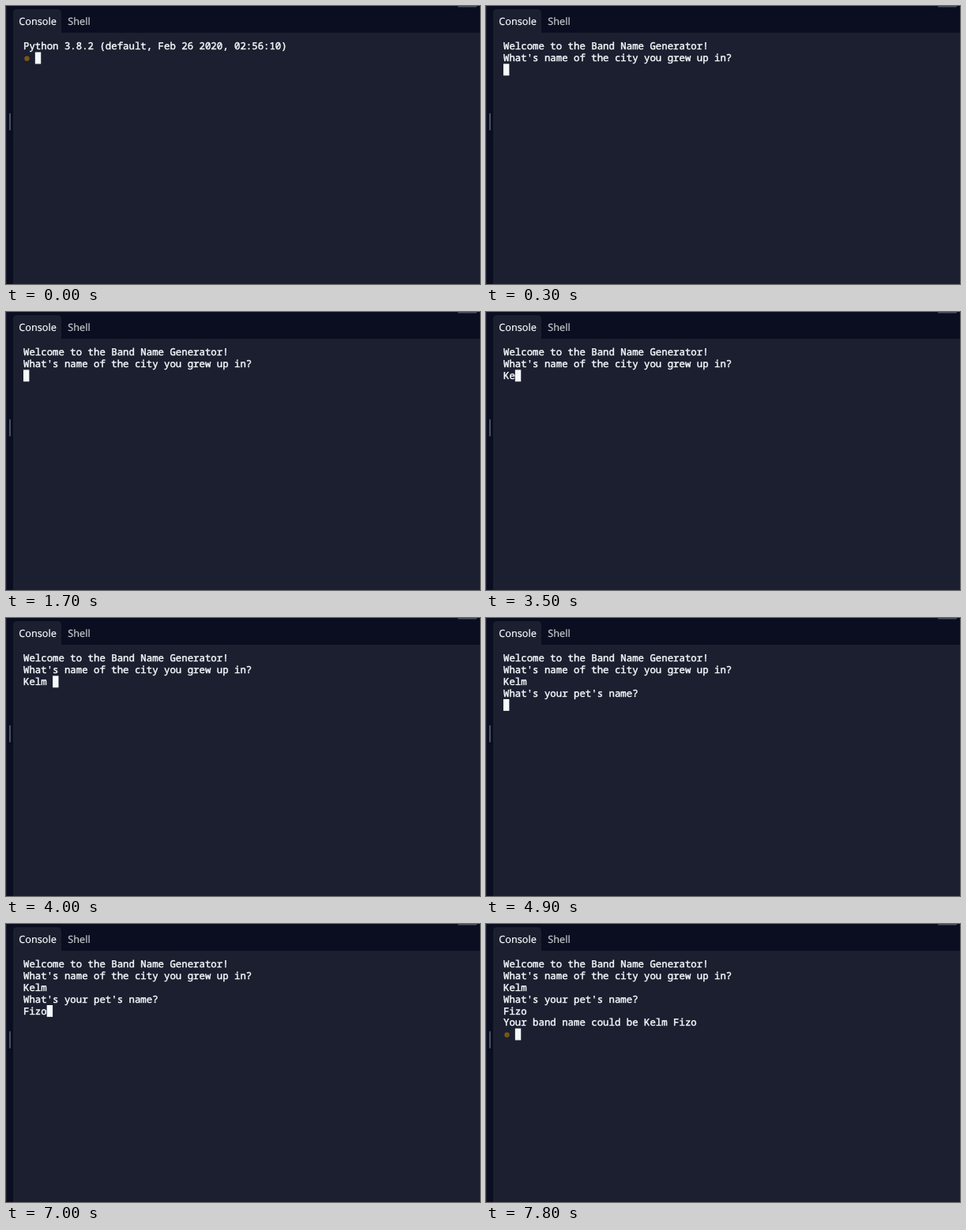
Write an HTML page that moves like this. It is 600 by 353 pixels and loops after 7900 ms.

```html
<!DOCTYPE html>
<html lang="en">
<head>
<meta charset="utf-8">
<title>Console</title>
<style>
  html, body { margin: 0; width: 100%; height: 100%; overflow: hidden; background: #0a0e20; }
  svg { display: block; width: 600px; height: 353px; }
  text { white-space: pre; text-rendering: geometricPrecision; fill: currentColor; stroke: currentColor; }
  .tab { font: 12.7px "Noto Sans", sans-serif; color: #f5f9fc; stroke-width: 0.2px; }
  .idle { color: #c2c8cc; }
  #lines { font: 12.37px "Noto Sans Mono", monospace; color: #f5f9fc; stroke-width: 0.45px; }
</style>
</head>
<body>
<svg viewBox="0 0 600 353">
  <rect width="600" height="353" fill="#0a0e20"/>
  <rect width="1" height="353" fill="#1b1f2f"/>
  <rect x="4" y="136" width="2" height="22" rx="1" fill="#4b5161"/>
  <rect x="572" y="-1" width="24" height="2.5" rx="1" fill="#4b5161"/>
  <path d="M9 353V9q0-5 5-5H65q5 0 5 5V34H600V353Z" fill="#1b1f2f"/>
  <text class="tab" x="16.2" y="24.3">Console</text>
  <text class="tab idle" x="78.2" y="24.3">Shell</text>
  <g id="lines"></g>
  <circle id="prompt" cx="26.5" r="3.2" fill="#75571b"/>
  <rect id="cursor" width="7.4" height="14.9" fill="#f5f9fc"/>
</svg>
<script>
const LOOP = 7900, LEFT = 22, TOP = 43.8, CHAR = 7.42, ROW = 14.8, BASELINE = 11.55;
const city = "Kelm", pet = "Fizo";
const cityKeys = [3500, 3500, 3700, 3800, 4000];
const petKeys = [6300, 6400, 6700, 6800];
const intro = ["Welcome to the Band Name Generator!", "What's name of the city you grew up in?"];

const linesGroup = document.getElementById("lines");
const promptDot = document.getElementById("prompt");
const cursor = document.getElementById("cursor");
const typed = (word, keys, t) => word.slice(0, keys.filter(key => key <= t).length);

// The last line holds the cursor.
function screenAt(t) {
  if (t < 100) return ["Python 3.8.2 (default, Feb 26 2020, 02:56:10)", "  "];
  const lines = [...intro, typed(city + " ", cityKeys, t)];
  if (t >= 4800) lines.push("What's your pet's name?", typed(pet, petKeys, t));
  if (t >= 7700) lines.push(`Your band name could be ${city} ${pet}`, "  ");
  return lines;
}

let shown;
function draw(t) {
  const lines = screenAt(t), key = lines.join("\n");
  if (key === shown) return;
  shown = key;
  linesGroup.replaceChildren(...lines.map((line, row) => {
    const text = document.createElementNS("http://www.w3.org/2000/svg", "text");
    text.setAttribute("x", LEFT);
    text.setAttribute("y", Math.round(TOP + row * ROW + BASELINE));
    text.textContent = line;
    return text;
  }));
  const last = lines.at(-1), top = TOP + (lines.length - 1) * ROW;
  cursor.setAttribute("x", LEFT + last.length * CHAR);
  cursor.setAttribute("y", top);
  promptDot.setAttribute("cy", top + 8.2);
  promptDot.setAttribute("visibility", last === "  " ? "visible" : "hidden");
}

const start = performance.now();
function frame() {
  draw((performance.now() - start) % LOOP);
  requestAnimationFrame(frame);
}
frame();
</script>
</body>
</html>
```
